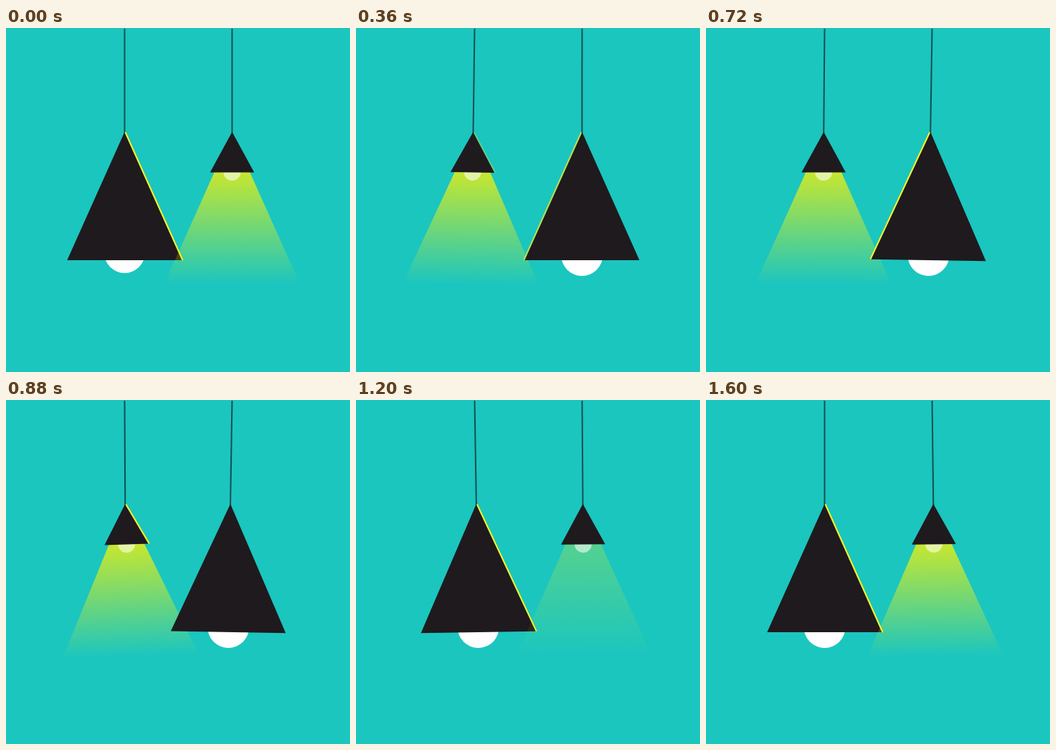
An HTML page with a canvas that plays this animation: 480 by 480 pixels, repeating every 1.64 s.

```html
<!DOCTYPE html>
<html lang="en">
<head>
<meta charset="utf-8">
<title>Swinging lamps</title>
<style>
  html, body { margin: 0; width: 100%; height: 100%; overflow: hidden; background: #1bc6bf; }
  canvas { display: block; width: 100vmin; height: 100vmin; }
</style>
</head>
<body>
<canvas id="stage" width="480" height="480"></canvas>
<script>
const ctx = document.getElementById('stage').getContext('2d');
const LOOP = 1640, STEP = 40;
const APEX = 145;
const DEG = Math.PI / 180;

const mix = (a, b, k) => a + (b - a) * k;
const sine = k => (1 - Math.cos(Math.PI * k)) / 2;

// Rises from 0 to 1 over the given span of time.
const ramp = (t, start, span) => Math.min(1, Math.max(0, (t - start) / span));
const ease = (t, start, span) => sine(ramp(t, start, span));

// Swings from 0 to 1, across to -1 and home again.
function sway(t, out, across, home) {
  return ease(t, 0, out) - 2 * ease(t, out, across) + ease(t, out + across, home);
}

// The lamps trade sizes twice per loop: one shrinks and lights up, the other grows.
const lamps = [
  { x: 165.5, side: 1, shrinkAt: 0, growAt: 880, bulbLag: -22, swingAt: 0, wobble: 1.75 },
  { x: 315.5, side: -1, shrinkAt: 880, growAt: 0, bulbLag: 40, swingAt: 300, wobble: 0 }
];

function pose({ side, shrinkAt, growAt, bulbLag, swingAt, wobble }, t) {
  const startsBig = shrinkAt < growAt ? 1 : 0;
  const lit = t - shrinkAt;
  const flicker = 0.67 * (ramp(lit, 200, 120) - ramp(lit, 320, 40));
  const rimSwap = ramp(t, 290, 100) - ramp(t, 790, 75);
  return {
    swing: sway(t - swingAt, 520, 600, 480) * DEG,
    tilt: wobble * sway(t - 320, 240, 280, 280) * DEG,
    size: startsBig + ease(t, growAt, 240) - ease(t, shrinkAt, 230),
    bulb: startsBig + ease(t, growAt, 196) - ease(lit, bulbLag, 196),
    light: 1 - startsBig + ramp(lit, 40, 80) - ramp(t, growAt, 120) - flicker,
    rim: side > 0 ? 1 - rimSwap : rimSwap
  };
}

const beam = ctx.createLinearGradient(0, 150, 0, 358);
beam.addColorStop(0, 'rgba(255,242,0,1)');
beam.addColorStop(1, 'rgba(255,242,0,0)');

function triangle(top, base, half, fill) {
  ctx.fillStyle = fill;
  ctx.beginPath();
  ctx.moveTo(0, top);
  ctx.lineTo(half, base);
  ctx.lineTo(-half, base);
  ctx.fill();
}

function line(x0, y0, x1, y1, color) {
  ctx.strokeStyle = color;
  ctx.lineWidth = 2;
  ctx.beginPath();
  ctx.moveTo(x0, y0);
  ctx.lineTo(x1, y1);
  ctx.stroke();
}

function drawLamp(lamp, t) {
  const { swing, tilt, size, bulb, light, rim } = pose(lamp, t);
  const base = mix(201.5, 324, size);
  const half = mix(30.8, 80.2, size);

  ctx.save();
  ctx.translate(lamp.x, 0);
  ctx.rotate(swing);
  line(0, 1, 0, APEX + 3, '#14504e');

  ctx.translate(0, APEX);
  ctx.rotate(tilt);
  ctx.translate(0, -APEX);

  ctx.globalAlpha = light;
  triangle(146, 358, 95, beam);

  ctx.globalAlpha = mix(0.56, 1, bulb);
  ctx.fillStyle = '#fff';
  ctx.beginPath();
  ctx.arc(0, mix(201, 317, bulb), mix(12, 29, bulb), 0, 2 * Math.PI);
  ctx.fill();

  ctx.globalAlpha = 1;
  triangle(APEX, base, half, '#1f1a1d');

  ctx.globalAlpha = rim;
  line(lamp.side, APEX + 0.5, lamp.side * (half + 0.8), base, '#fff21f');
  ctx.restore();
}

function draw(now) {
  const t = Math.floor((now % LOOP) / STEP) * STEP;
  ctx.fillStyle = '#1bc6bf';
  ctx.fillRect(0, 0, 480, 480);
  lamps.forEach(lamp => drawLamp(lamp, t));
}

let start;
function tick(now) {
  start ??= now;
  draw(now - start);
  requestAnimationFrame(tick);
}
draw(0);
requestAnimationFrame(tick);
</script>
</body>
</html>
```
